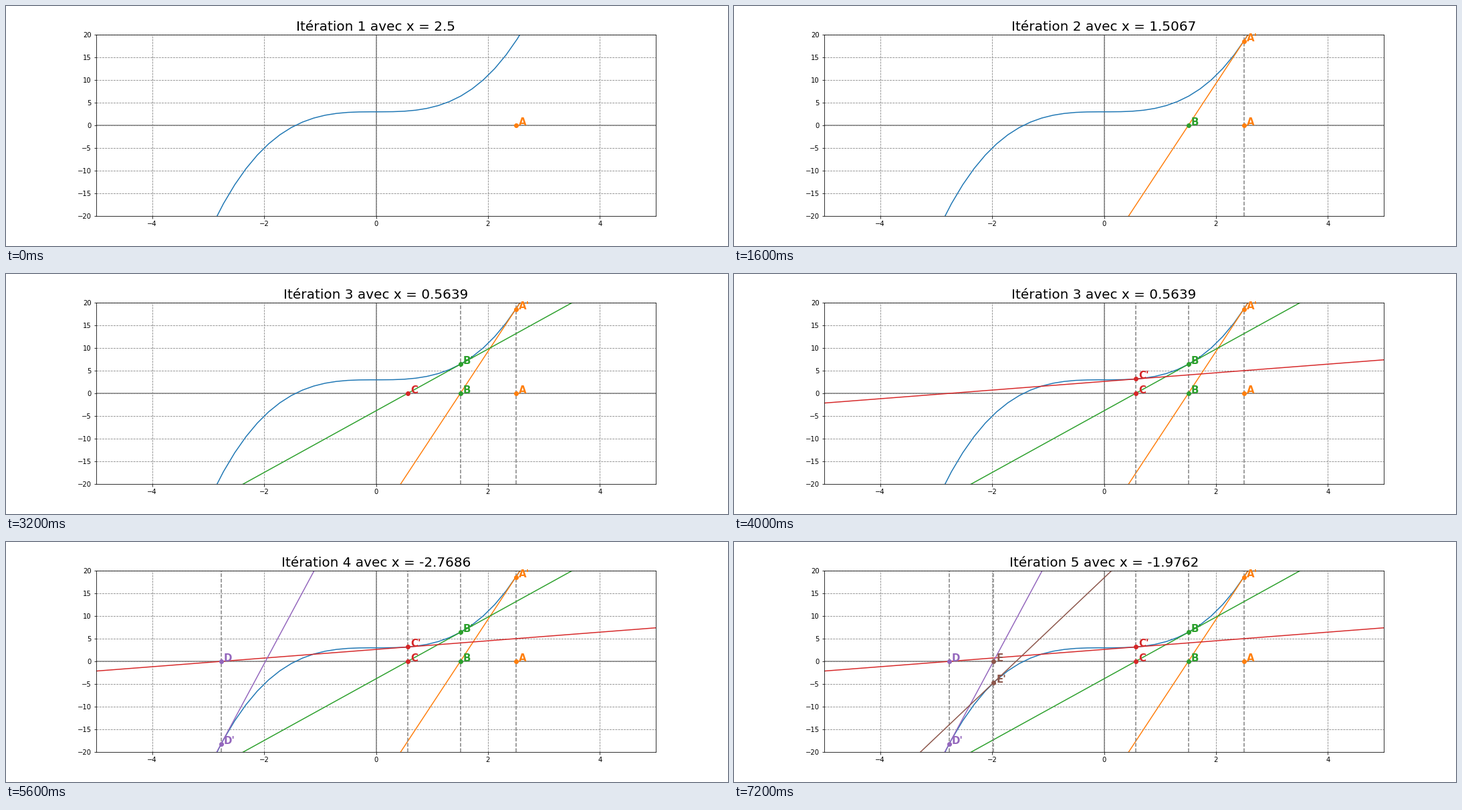
These frames come from a looping animation (1080x360 px, 8000 ms). A matplotlib script:

```python
import matplotlib.pyplot as plt
import numpy as np
from matplotlib.animation import FuncAnimation

STEP_MS = 800
NAMES = "ABCDE"


def f(x):
    return x**3 + 3


def slope(x):
    return 3 * x**2


# Newton's method from x = 2.5
roots = [2.5]
while len(roots) < len(NAMES):
    x = roots[-1]
    roots.append(x - f(x) / slope(x))

plt.rcParams["font.family"] = "DejaVu Sans"
fig, ax = plt.subplots(figsize=(15, 5), dpi=72)
fig.subplots_adjust(left=0.125, right=0.9, bottom=0.125, top=0.88)

xs = np.linspace(-10, 10, 100)
ax.grid(color="gray", linestyle="--")
ax.axhline(0, color="gray")
ax.axvline(0, color="gray")
ax.plot(xs, f(xs), color="C0")
ax.set(xlim=(-5, 5), ylim=(-20, 20),
       xticks=range(-4, 5, 2), yticks=range(-20, 21, 5))
title = ax.set_title("", fontsize=20)


def labelled_point(x, y, name, color):
    dot, = ax.plot(x, y, "o", color=color, zorder=2.5)
    text = ax.text(x + 0.05, y, name, color=color, fontsize=15, weight="bold")
    return [dot, text]


# Two stages per iteration: point on the axis, then its tangent
stages = []
for i, (name, x) in enumerate(zip(NAMES, roots)):
    color = f"C{i + 1}"
    stages.append(labelled_point(x, 0, name, color))
    guide = ax.axvline(x, color="gray", linestyle="--")
    tangent, = ax.plot(xs, f(x) + slope(x) * (xs - x), color=color)
    stages.append([guide, tangent] + labelled_point(x, f(x), name + "'", color))


def update(frame):
    for k, artists in enumerate(stages):
        for artist in artists:
            artist.set_visible(k <= frame)
    i = frame // 2
    title.set_text(f"Itération {i + 1} avec x = {round(roots[i], 4)}")
    return [title] + sum(stages, [])


anim = FuncAnimation(fig, update, frames=len(stages), interval=STEP_MS,
                     init_func=lambda: update(0), repeat=True, repeat_delay=0)
plt.show()
```
